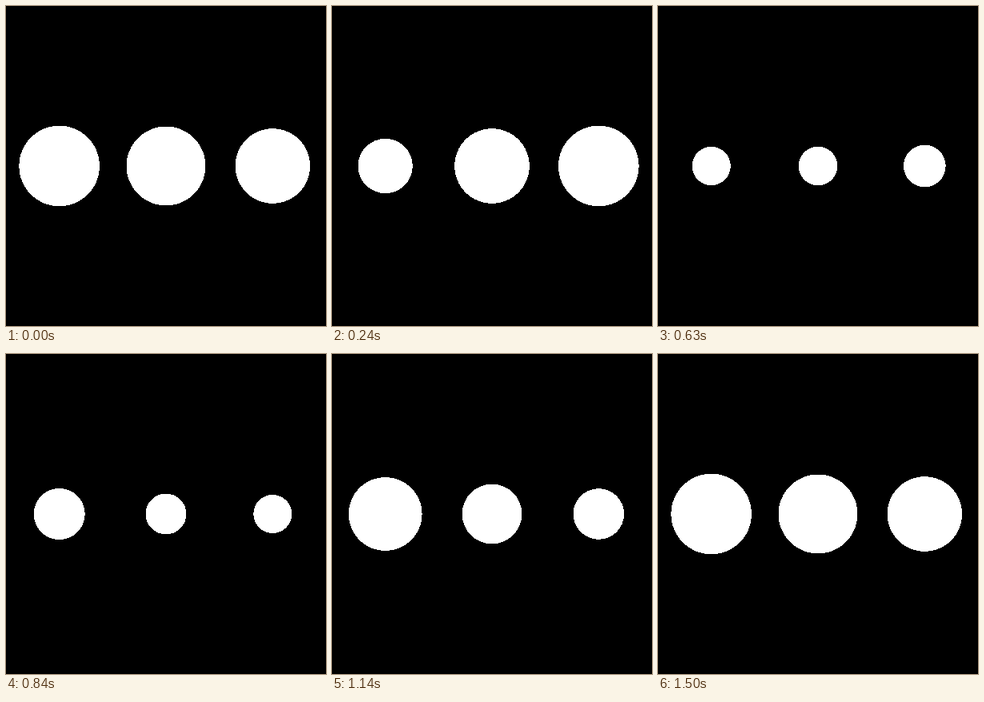
Write an HTML page that moves like this. It is 400 px wide and 400 px high and loops after 1.53 s.

```html
<!DOCTYPE html>
<html lang="en">
<head>
<meta charset="utf-8">
<title>Three pulsing dots</title>
<style>
  html, body { margin: 0; width: 100%; height: 100%; overflow: hidden; background: #000; }
  svg { display: block; width: 100vw; height: 100vh; }
  circle { fill: #fff; shape-rendering: crispEdges; }
</style>
</head>
<body>
<svg viewBox="0 0 400 400">
  <circle cx="66.67" cy="200" r="50.2"/>
  <circle cx="200" cy="200" r="49.2"/>
  <circle cx="333.33" cy="200" r="46.7"/>
</svg>
<script>
  const STEP = 30, LOOP = 1530, CYCLE = 1500, SHRINK = 600;
  const MIN = 24, MAX = 50.3;
  const SHRINK_EASE = [0.4, 0.2];
  const DOTS = [
    { start: 0, grow: [0.285, 0.356] },
    { start: 120, grow: [0.32, 0.575] },
    { start: 240, grow: [0.32, 0.58] }
  ];
  const circles = document.querySelectorAll('circle');

  // cubic-bezier(x1, 0, x2, 1)
  function ease(x, [x1, x2]) {
    let lo = 0, hi = 1;
    for (let i = 0; i < 20; i++) {
      const s = (lo + hi) / 2, r = 1 - s;
      if (3 * r * r * s * x1 + 3 * r * s * s * x2 + s * s * s < x) lo = s;
      else hi = s;
    }
    return lo * lo * (3 - 2 * lo);
  }

  function radius({ start, grow }, time) {
    const t = (time - start + CYCLE) % CYCLE;
    const size = t < SHRINK
      ? 1 - ease(t / SHRINK, SHRINK_EASE)
      : ease((t - SHRINK) / (CYCLE - SHRINK), grow);
    return MIN + (MAX - MIN) * size;
  }

  function draw() {
    const now = performance.now() % LOOP;
    const time = Math.floor(now / STEP) * STEP;
    DOTS.forEach((dot, i) => circles[i].setAttribute('r', radius(dot, time).toFixed(2)));
    requestAnimationFrame(draw);
  }
  draw();
</script>
</body>
</html>
```
